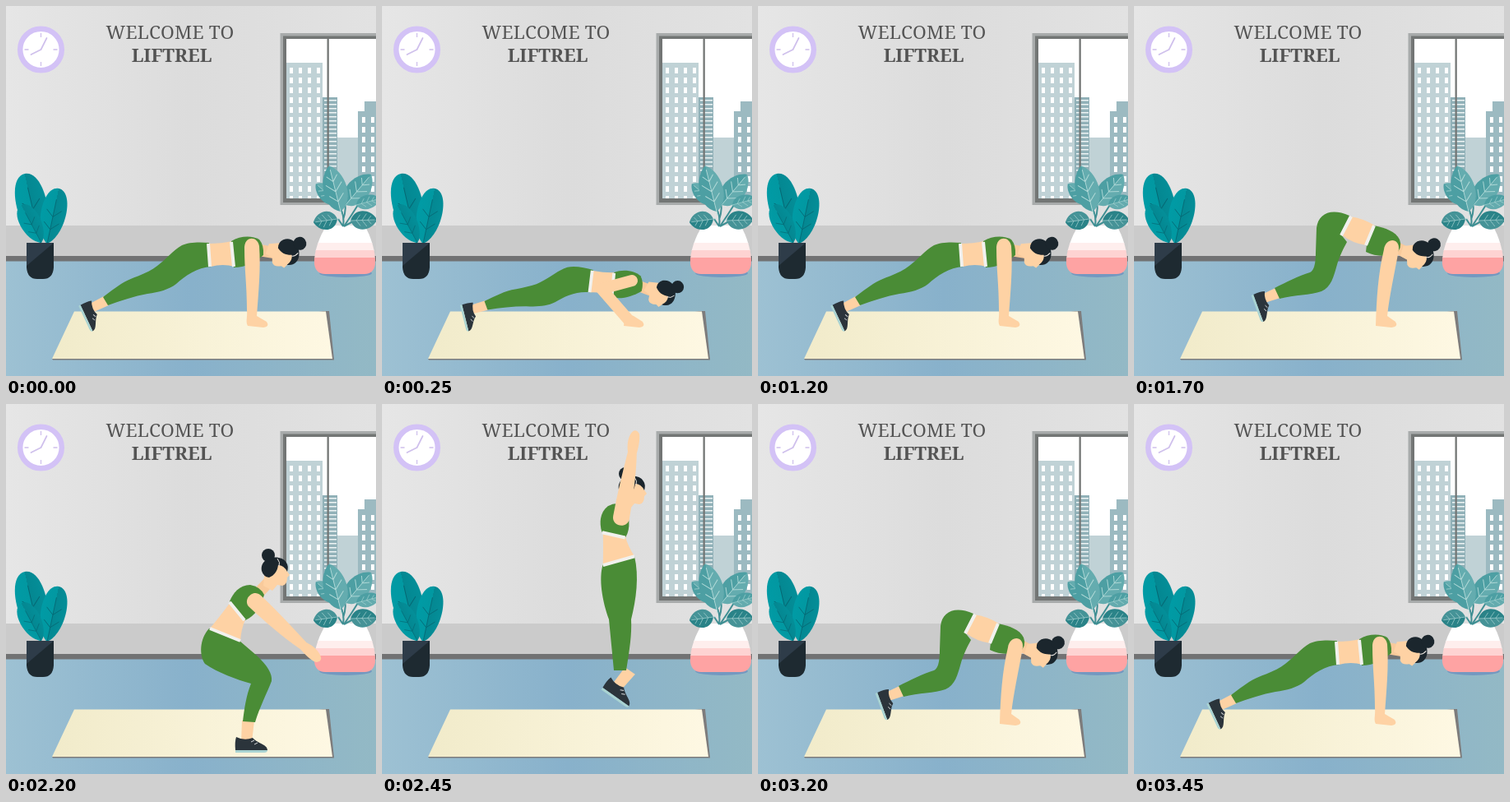
Animation of 450 by 450 pixels, one loop 3.95 s. Source, as an HTML page without scripts:

```html
<!DOCTYPE html>
<html lang="en">
<head>
<meta charset="utf-8">
<title>Burpee workout</title>
<style>
html, body { margin: 0; width: 100%; height: 100%; overflow: hidden; }
svg.stage { display: block; width: 100vw; height: 100vh; }
text { font-family: "Noto Serif", serif; fill: #545454; text-anchor: middle; }
.green { fill: #4a8c36; }
.skin { fill: #fed2a4; }
.hair { fill: #1b262d; }
.band { fill: none; stroke: #f1f1ee; stroke-width: 4; }
.neck { fill: none; stroke: #f9ca9b; stroke-width: 14; }

.pose { visibility: hidden; animation: 3950ms step-end infinite; }
.high { animation-name: high; }
.low { animation-name: low; }
.tuck { animation-name: tuck; }
.crouch { animation-name: crouch; }
.squat { animation-name: squat; }
.jump { animation-name: jump; }
@keyframes high {
  0%, 15.189%, 30.379%, 87.341% { visibility: visible; }
  6.329%, 21.518%, 36.708% { visibility: hidden; }
  100% { visibility: visible; }
}
@keyframes low {
  0%, 15.189%, 30.379%, 43.037%, 100% { visibility: hidden; }
  6.329%, 21.518%, 36.708% { visibility: visible; }
}
@keyframes tuck {
  0%, 49.367%, 87.341%, 100% { visibility: hidden; }
  43.037%, 81.012% { visibility: visible; }
}
@keyframes crouch {
  0%, 55.696%, 81.012%, 100% { visibility: hidden; }
  49.367%, 74.683% { visibility: visible; }
}
@keyframes squat {
  0%, 62.025%, 74.683%, 100% { visibility: hidden; }
  55.696%, 68.354% { visibility: visible; }
}
@keyframes jump {
  0%, 68.354%, 100% { visibility: hidden; }
  62.025% { visibility: visible; }
}
</style>
</head>
<body>
<svg class="stage" viewBox="0 0 450 450">
<defs>
  <linearGradient id="wall">
    <stop offset="0" stop-color="#e6e6e6"/><stop offset=".5" stop-color="#dcdcdc"/><stop offset="1" stop-color="#e2e2e2"/>
  </linearGradient>
  <linearGradient id="floor">
    <stop offset="0" stop-color="#9dc1d3"/><stop offset=".5" stop-color="#88b1cb"/><stop offset="1" stop-color="#93b9c5"/>
  </linearGradient>
  <linearGradient id="mat">
    <stop offset="0" stop-color="#f1ebca"/><stop offset="1" stop-color="#fef8e3"/>
  </linearGradient>
  <linearGradient id="teal" x2="1">
    <stop offset="0" stop-color="#009ba5"/><stop offset=".5" stop-color="#0298a1"/>
    <stop offset=".5" stop-color="#048791"/><stop offset="1" stop-color="#048f99"/>
  </linearGradient>
  <pattern id="panes" width="11" height="12" x="343" y="74" patternUnits="userSpaceOnUse">
    <path d="M2 1h4v7h-4z" fill="#fff"/>
  </pattern>
  <pattern id="slats" width="20" height="5" x="385" y="113" patternUnits="userSpaceOnUse">
    <path d="M2 1h15v1.500h-15z" fill="#eef4f5"/>
  </pattern>
  <clipPath id="glass"><path d="M341 40h109v194H341z"/></clipPath>
  <clipPath id="potShape"><path d="M390 267H436C444 280 450 300 449 314Q447 326 436 326H388Q377 326 375 314C374 300 381 280 390 267z"/></clipPath>

  <g id="frond">
    <path d="M0 0C-20-14-20-70 0-70C20-70 20-14 0 0z" fill="url(#teal)"/>
    <path d="M0 0V-56M0-18l-9-8M0-18l9-9M0-34l-9-8M0-34l9-9" fill="none" stroke="#066873" stroke-width=".8"/>
  </g>
  <g id="leaf">
    <path d="M0 0C-20-8-15-38 0-46C15-38 20-8 0 0z"/>
    <path d="M0 0C20-8 15-38 0-46z" fill="#fff" opacity=".13"/>
    <path d="M0 4V-42M0-10l-8-7M0-10l8-7M0-20l-9-8M0-20l9-8M0-30l-6-6M0-30l6-6" fill="none" stroke="#b4dbd9" stroke-width=".8"/>
  </g>

  <path id="ankle" class="skin" d="M-6-20H9L6 6H-7z"/>
  <g id="shoe">
    <path d="M-13 0Q-3 5 7 1C13 8 25 9 25 16H-14Q-15 6-13 0z" fill="#2b343b"/>
    <path d="M-14 16H25Q25 19 21 19H-14z" fill="#a9d3d2"/>
    <path d="M5 6l4-2M9 9l4-2" stroke="#d9dbdd" stroke-width="1"/>
  </g>
  <g id="head">
    <path class="skin" d="M-12-4C-8-14 8-16 13-9L14-1L18 5L15 8Q15 17 9 18L3 17L-3 24L-14 18z"/>
    <path class="hair" d="M-16 0C-19-18 8-21 14-10Q17-6 15 1Q11-7 4-7C3 0 0 5-7 8Q-14 7-16 0z"/>
    <circle class="hair" cx="-8" cy="-19" r="8"/>
    <path d="M3-15Q7-10 5-6" fill="none" stroke="#e9e4df" stroke-width="1"/>
  </g>
  <path id="arm" class="skin" d="M-10 0C-10-13 10-13 10 0C10 26 8 54 6 80C9 90 9 100 4 106Q0 109-4 104C-6 98-6 88-5 80C-9 54-10 26-10 0z"/>
  <g id="torso">
    <path class="skin" d="M248 273Q262 256 273 241L291 262Q286 274 285 288z"/>
    <path class="green" d="M272 240C276 230 284 220 297 220Q309 222 314 232C310 246 303 258 291 263z"/>
    <path class="band" d="M272 241L290 263M248 273L285 288"/>
  </g>
  <g id="plank">
    <path class="neck" d="M302 296L326 300"/>
    <path class="skin" d="M119 353L102 362L107 372L125 364z"/>
    <use href="#shoe" transform="translate(109 369) rotate(65) scale(.9)"/>
    <path class="green" d="M247 288C236 287 222 287 214 291C203 297 196 307 184 316C172 326 150 331 140 338Q128 346 118 354L124 364C140 358 156 353 172 350C186 348 198 345 207 338C218 328 232 318 250 317z"/>
    <path class="skin" d="M247 289Q262 289 275 286L278 317Q264 313 249 317z"/>
    <path class="green" d="M274 286C285 279 300 279 308 284Q314 291 313 303C302 312 291 318 277 318z"/>
    <path class="band" d="M274 287L277 317M246 289L248 317"/>
    <use href="#head" transform="translate(340 300) rotate(80)"/>
  </g>
</defs>

<!-- room -->
<path d="M0 0h450v268H0z" fill="url(#wall)"/>
<path d="M0 267h450v38H0z" fill="#cbcbcb"/>
<path d="M0 304h450v7H0z" fill="#717273"/>
<path d="M0 310.500h450v140H0z" fill="url(#floor)"/>
<text x="199.500" y="40" font-size="22.600" letter-spacing=".2">WELCOME TO</text>
<text x="201.500" y="68" font-size="22.500" font-weight="700">LIFTREL</text>

<!-- clock -->
<g transform="translate(42.500 53)" fill="none" stroke="#cfc0ec">
  <circle r="25.300" fill="#fff" stroke="#d3c2f6" stroke-width="6.500"/>
  <path d="M0-20v5M0 20v-5M-20 0h5M20 0h-5" stroke-width="1.300"/>
  <path d="M0 0L7-14M0 0L-12 6" stroke-width="1.700" stroke-linecap="round"/>
</g>

<!-- window -->
<path d="M333.500 33H450v209H333.500z" fill="#a8abab"/>
<path d="M337 36.500h113V239H337z" fill="#737675"/>
<path d="M341 40h109v194H341z" fill="#fff"/>
<g clip-path="url(#glass)">
  <path d="M341 69h44v165h-44z" fill="#c0d2d6"/>
  <path d="M343 74h40v160h-40z" fill="url(#panes)"/>
  <path d="M385 111h18v123h-18z" fill="#91b1b8"/>
  <path d="M385 113h18v121h-18z" fill="url(#slats)"/>
  <path d="M403 160h25v74h-25z" fill="#c0d2d6"/>
  <path d="M428 128h8v-12h14v118h-22z" fill="#9cbac1"/>
  <path d="M431 132h19v102h-19z" fill="url(#panes)"/>
  <path d="M390.500 40h2.300v194h-2.300z" fill="#737675"/>
</g>

<!-- left plant -->
<use href="#frond" transform="translate(42 288) rotate(-13) scale(1.230)"/>
<use href="#frond" transform="translate(50 289) rotate(12) scale(1.020 .980)"/>
<use href="#frond" transform="translate(43 288) rotate(-28) scale(.85 .74)"/>
<path d="M25 288H58V318Q57 332 45 332H38Q26 332 25 318z" fill="#1e2a31"/>
<path d="M25 288H58L25 316z" fill="#2e3c49"/>

<!-- right plant -->
<ellipse cx="413" cy="325" rx="32" ry="5" fill="#7498c0"/>
<g clip-path="url(#potShape)">
  <path d="M370 262h80v27h-80z" fill="#fff"/>
  <path d="M370 288h80v10h-80z" fill="#feeeed"/>
  <path d="M370 297h80v10h-80z" fill="#fed3d2"/>
  <path d="M370 306h80v22h-80z" fill="#fea3a3"/>
</g>
<path d="M410 268Q412 255 406 245M411 268Q420 255 428 242M410 268L404 259M411 268L422 262M410 260Q415 245 411 235" fill="none" stroke="#3f8f93" stroke-width="2"/>
<g fill="#4d9fa3">
  <use href="#leaf" transform="translate(405 240) rotate(-50) scale(.8)"/>
  <use href="#leaf" transform="translate(413 242) rotate(40) scale(1.050)"/>
  <use href="#leaf" transform="translate(407 250) rotate(-14) scale(1.100 1.250)"/>
  <use href="#leaf" transform="translate(426 242) rotate(75) scale(.65)"/>
</g>
<g fill="#2a8388">
  <use href="#leaf" transform="translate(403 259) rotate(-98) scale(.85 .640)"/>
  <use href="#leaf" transform="translate(419 261) rotate(88) scale(.85 .7)"/>
</g>

<!-- mat -->
<path d="M386 371H393L399 430.500H57L56 429z" fill="#7d7c7c"/>
<path d="M83 371.500H389L397 429H56z" fill="url(#mat)"/>

<!-- poses -->
<g class="pose high">
  <use href="#plank"/>
  <path class="skin" d="M290 296C289 279 306 279 308 292C310 318 307 350 305 377L317 384Q321 390 313 391L294 389C291 384 294 378 293 370C293 340 290 320 290 296z"/>
</g>

<g class="pose low">
  <use href="#plank" transform="translate(105 395) rotate(11) scale(.95) translate(-105 -395)"/>
  <path d="M304 334L267 344L300 382" fill="none" stroke="#fed2a4" stroke-width="14" stroke-linecap="round" stroke-linejoin="round"/>
  <path class="skin" d="M296 374L306 377L317 384Q321 390 313 391L294 389z"/>
</g>

<g class="pose tuck">
  <path class="neck" d="M314 291L335 302"/>
  <path class="skin" d="M172 343L155 351L159 361L178 355z"/>
  <use href="#shoe" transform="translate(163 358) rotate(70) scale(.9)"/>
  <path class="green" d="M262 255C240 245 224 252 222 270L221 300Q221 321 214 324C200 328 185 336 171 343L177 356C195 351 215 352 228 347C240 342 243 328 246 318C250 303 255 295 259 287L251 277z"/>
  <path class="skin" d="M263 256Q278 258 293 267L283 291Q266 289 252 278z"/>
  <path class="green" d="M292 267C306 270 318 274 323 284Q327 294 318 302Q298 307 282 299L283 290z"/>
  <path class="band" d="M264 256L252 279M292 267L282 291"/>
  <path class="skin" d="M304 296C306 282 323 281 322 296C317 325 311 350 308 377L318 384Q322 390 313 391L294 389C295 355 297 325 304 296z"/>
  <use href="#head" transform="translate(348 302) rotate(78)"/>
</g>

<g class="pose crouch">
  <use href="#ankle" transform="translate(293 405)"/>
  <use href="#shoe" transform="translate(293 405)"/>
  <path class="neck" d="M313 300L335 278"/>
  <path class="green" d="M247 322C236 338 236 356 246 364C264 369 285 363 302 357Q290 374 288 389L303 390C310 376 322 358 327 344C328 334 318 328 304 326L283 340z"/>
  <use href="#torso" transform="translate(0 50) rotate(14 267 280)"/>
  <use href="#arm" transform="translate(311 301) rotate(-20)"/>
  <use href="#head" transform="translate(342 271) rotate(14)"/>
</g>

<g class="pose squat">
  <use href="#ankle" transform="translate(293 405)"/>
  <use href="#shoe" transform="translate(293 405)"/>
  <path class="neck" d="M304 233L321 215"/>
  <path class="green" d="M247 273C235 286 235 306 242 316C258 327 280 335 298 340C292 355 290 370 288 386L303 387C308 370 318 350 323 337C324 328 318 318 305 306L284 288z"/>
  <use href="#torso"/>
  <use href="#arm" transform="translate(303 240) rotate(-47)"/>
  <use href="#head" transform="translate(327 203)"/>
</g>

<g class="pose jump">
  <g transform="translate(289 340) rotate(35)">
    <use href="#ankle"/>
    <use href="#shoe"/>
  </g>
  <path class="neck" d="M291 138L299 114"/>
  <path class="green" d="M269 194C263 212 268 240 276 262L282 324H297C301 300 304 280 303 262C309 238 313 210 307 185z"/>
  <use href="#torso" transform="translate(21 -90) rotate(-38 267 280)"/>
  <use href="#head" transform="translate(304 104)"/>
  <use href="#arm" transform="translate(291 138) rotate(190)"/>
</g>
</svg>
</body>
</html>
```
